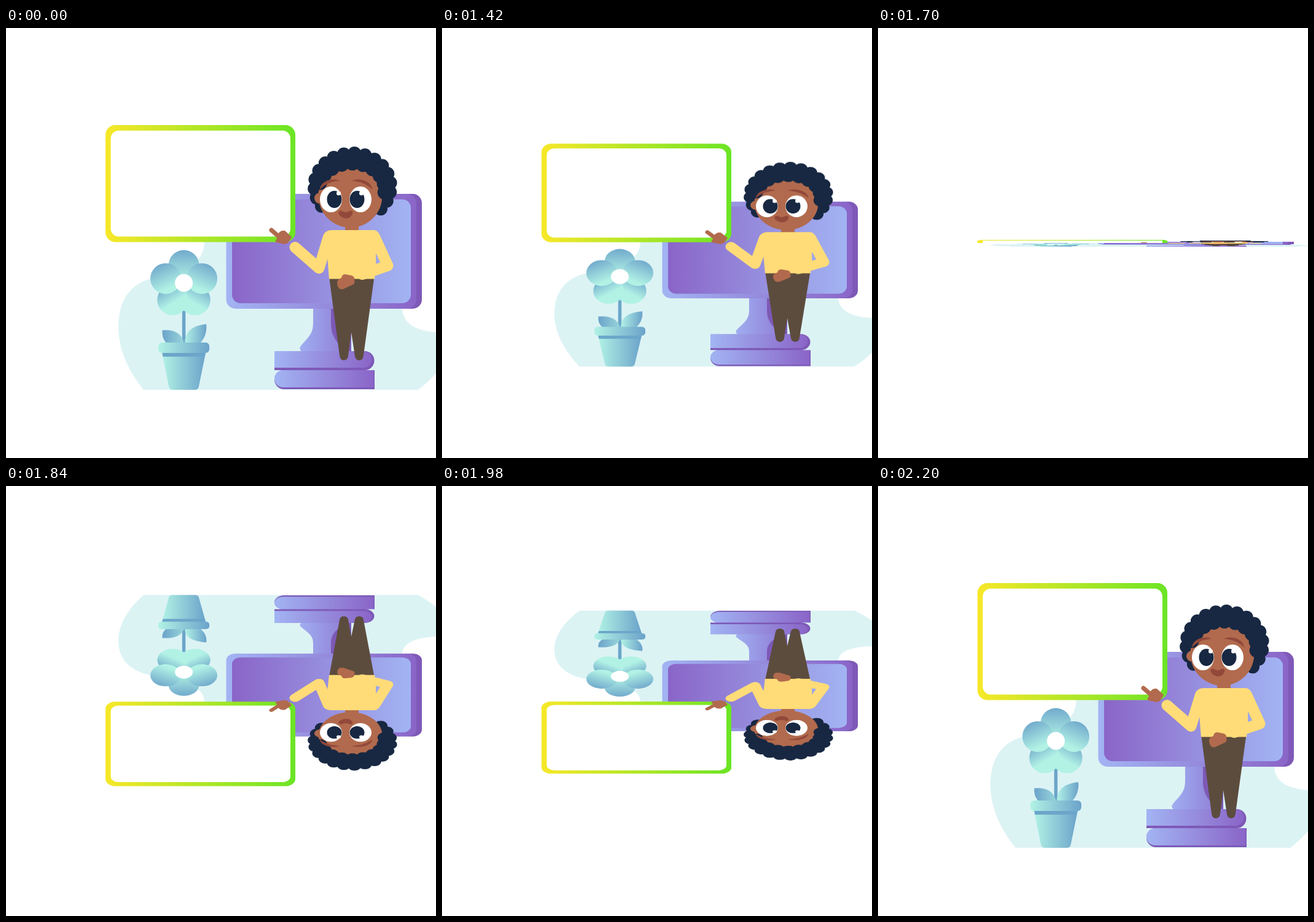
An HTML page that plays this animation: 700x700 px, repeating every 3000 ms.

```html
<!DOCTYPE html>
<html lang="en">
<head>
<meta charset="utf-8">
<title>Presenter flip</title>
<style>
html, body { margin: 0; width: 100%; height: 100%; overflow: hidden; background: #fff; }
#scene { position: absolute; left: 0; top: 0; width: 700px; height: 700px; transform-origin: 350px 350px; }
</style>
</head>
<body>
<svg id="scene" viewBox="0 0 700 700">
  <defs>
    <linearGradient id="violet"><stop stop-color="#a2b4f3"/><stop offset="1" stop-color="#8a65c8"/></linearGradient>
    <linearGradient id="screen"><stop stop-color="#8a65c8"/><stop offset="1" stop-color="#a2b4f3"/></linearGradient>
    <linearGradient id="neck"><stop stop-color="#a0aef0"/><stop offset="1" stop-color="#8f7ad4"/></linearGradient>
    <linearGradient id="lime"><stop stop-color="#f7e829"/><stop offset="1" stop-color="#6be525"/></linearGradient>
    <linearGradient id="mint"><stop stop-color="#b1f2e5"/><stop offset="1" stop-color="#6ba3ca"/></linearGradient>
    <linearGradient id="leaf"><stop stop-color="#6ba3ca"/><stop offset="1" stop-color="#98d5da"/></linearGradient>
  </defs>

  <path fill="#dcf3f4" d="M224 589C196 554 183 520 183 486C183 440 205 415 240 407C290 396 323 385 323 346H645V455C645 476 660 493 700 495V562Q687 577 671 589Z"/>

  <!-- monitor -->
  <path fill="url(#neck)" d="M500 455H560V526H481Q475 522 482 515C497 499 500 494 500 478Z"/>
  <path fill="#7d59b6" d="M529 455H562V526H555C534 510 529 497 529 480Z"/>
  <rect x="380" y="270" width="297" height="187" rx="15" fill="#7e59b7"/>
  <rect x="358.500" y="270" width="309.500" height="187" rx="15" fill="url(#violet)"/>
  <rect x="368" y="279" width="291" height="169" rx="14" fill="url(#screen)"/>

  <!-- books -->
  <path fill="#7e59b7" d="M437 526H584A15.500 15.500 0 0 1 584 557H437Z"/>
  <path fill="url(#violet)" d="M437 526H582A13.500 13.500 0 0 1 582 553H437Z"/>
  <path fill="#7e59b7" d="M600 557H452.500A15.500 15.500 0 0 0 452.500 588H600Z"/>
  <path fill="url(#violet)" d="M598.500 557H451A14 14 0 0 0 451 585H598.500Z"/>

  <!-- flower -->
  <path stroke="#6ba6ca" stroke-width="5.500" d="M289.500 430V515"/>
  <path fill="url(#leaf)" d="M254.500 492Q285 489 290 514H262Q253 505 254.500 492Z"/>
  <path fill="url(#mint)" d="M326 482Q328 501 315 514H291Q291 485 326 482Z"/>
  <g id="petals"></g>
  <circle cx="289.500" cy="415" r="14.500" fill="#fff"/>
  <path fill="url(#mint)" d="M254 529H325L314 583Q313 589 307 589H272Q266 589 265 583Z"/>
  <path fill="#6ba6ca" d="M254 528H325L323.500 535H255.500Z"/>
  <rect x="248" y="512" width="83" height="17" rx="6" fill="url(#mint)"/>

  <!-- board -->
  <rect x="162" y="158" width="309" height="190.500" rx="16" fill="url(#lime)"/>
  <rect x="170.500" y="167" width="292.500" height="172.500" rx="13" fill="#fff"/>

  <!-- head -->
  <g id="hair" fill="#182842"><ellipse cx="563" cy="256" rx="62" ry="54"/></g>
  <g fill="#b16a4d">
    <path d="M552 315H574V333H552Z"/>
    <circle cx="511" cy="277" r="9"/>
    <circle cx="560.500" cy="273" r="52"/>
  </g>
  <g id="fringe" fill="#182842"></g>
  <g fill="#92493a">
    <path d="M511 263C512 250 530 243 543 248.500C531 250 520 253 511 263Z"/>
    <path d="M563 248.500C578 243 595 250 596.500 263C587 254 577 250 563 248.500Z"/>
    <path d="M541 301Q542 296 547 298Q553 302 559 298Q564 296 564.500 301Q562 310 553 310Q544 309 541 301Z"/>
  </g>
  <g id="eyes"></g>

  <!-- body -->
  <path fill="#5c4c3e" d="M526 405H599.500L582 533Q581 541 575 541Q569 541 568 534L562 495L557 534Q556 541 550 541Q544 541 543 533Z"/>
  <path fill="#ffdc78" d="M517 340Q519 329 529 329H600Q608 331 608 341L602 370Q603 390 600 408.500H526L523 372Z"/>
  <g fill="none" stroke="#ffdc78" stroke-width="18" stroke-linecap="round" stroke-linejoin="round">
    <path d="M525 340L509.500 391L470.500 357"/>
    <path d="M600 340L621.500 387L580 401"/>
  </g>
  <g fill="#b16a4d">
    <path d="M432 329L447 342" stroke="#b16a4d" stroke-width="7" stroke-linecap="round"/>
    <path d="M443 335Q447 329 454 330L465 340Q460 351 454 352L440 349Q437 346 441 343Z"/>
    <path d="M539 415Q539 409 546 407Q547 400 553 401L563 403Q568 405 567 410Q569 416 564 418L549 425Q540 427 539 415Z"/>
  </g>
</svg>
<script>
const NS = "http://www.w3.org/2000/svg";
const RAD = Math.PI / 180;
const byId = id => document.getElementById(id);
const scene = byId("scene");

function add(parent, tag, attrs) {
  const node = document.createElementNS(NS, tag);
  for (const key in attrs) node.setAttribute(key, attrs[key]);
  parent.append(node);
}

function curls(parent, { cx, cy, rx, ry, from, to, count, r }) {
  for (let i = 0; i < count; i++) {
    const a = (from + (to - from) * i / (count - 1)) * RAD;
    add(parent, "circle", { cx: cx + rx * Math.cos(a), cy: cy + ry * Math.sin(a), r });
  }
}
curls(byId("hair"), { cx: 564, cy: 258, rx: 62, ry: 54, from: 144, to: 402, count: 17, r: 11 });
curls(byId("fringe"), { cx: 563, cy: 263, rx: 54, ry: 43, from: 195, to: 366, count: 10, r: 12 });

for (const side of [-1, 1]) {
  const eye = (dx, cy, rx, ry, fill) => add(byId("eyes"), "ellipse", { cx: 553 + side * 24 + dx, cy, rx, ry, fill });
  const look = -side * 5.5;
  eye(0, 279, 18, 21, "#fff");
  eye(look, 279, 12, 14, "#182842");
  eye(look + 7, 269, 3.5, 3.5, "#fff");
}

// five petals, lower ones first, each darkening away from the stem
for (const turn of [54, 126, -90, 198, -18]) {
  const dx = 31 * Math.cos(turn * RAD), dy = 31 * Math.sin(turn * RAD);
  const id = "petal" + turn;
  const lean = Math.atan2(dy - 55, dx) / RAD;
  add(scene.querySelector("defs"), "linearGradient", {
    id, href: "#mint", x1: (dy + 31) / 140, x2: 1.1, gradientTransform: `rotate(${lean} .5 .5)`
  });
  add(byId("petals"), "circle", { cx: 289.5 + dx, cy: 417.5 + dy, r: 25, fill: `url(#${id})` });
}

// flip: a slow quarter turn to edge-on, then the rest of the circle
const LOOP = 3000;
const steps = [
  [0, 0, "linear"],
  [1192, 0, "cubic-bezier(.364, 0, .65, 1)"],
  [1743, 90, "cubic-bezier(.37, .22, .63, .78)"],
  [2200, 360, "linear"],
  [LOOP, 360, "linear"]
];
scene.animate(
  steps.map(([time, angle, easing]) => ({
    offset: time / LOOP, transform: `rotateX(${angle}deg)`, easing
  })),
  { duration: LOOP, iterations: Infinity }
);
</script>
</body>
</html>
```
